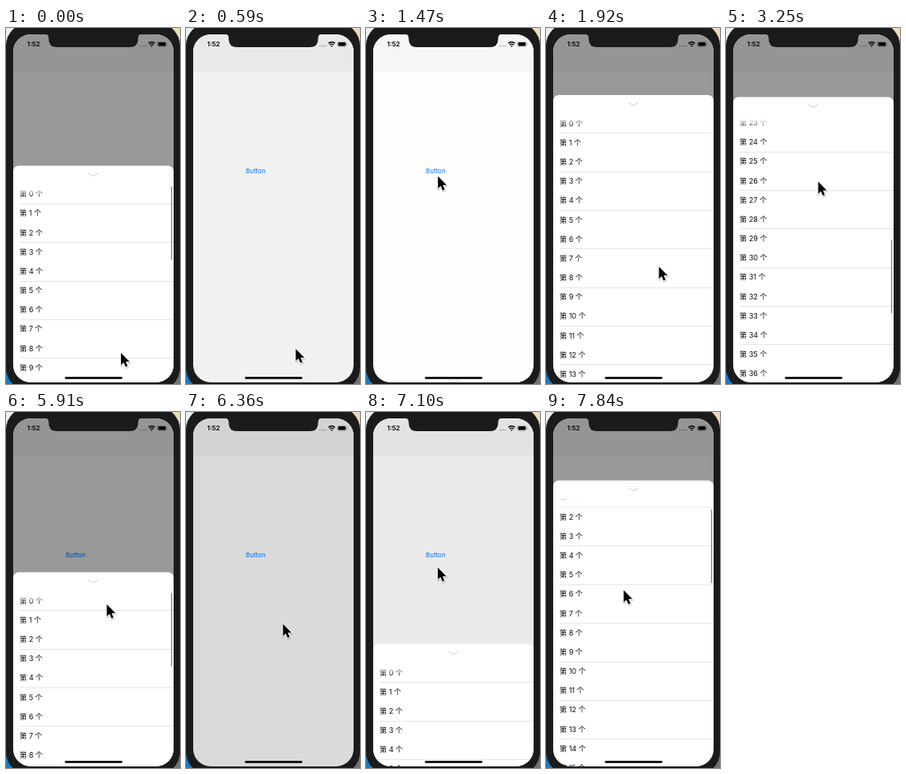
Animation, 218 px wide and 446 px high, one loop 7990 ms. Source, as an HTML page:

```html
<!DOCTYPE html>
<html lang="zh-CN">
<head>
<meta charset="utf-8">
<title>Bottom sheet</title>
<style>
  html, body { margin: 0; width: 100%; height: 100%; overflow: hidden; background: #1b1b1b; }
  #stage { display: block; width: 100%; height: 100%; }
  text { font-family: Inter, "Noto Sans CJK SC", "Noto Sans CJK", "Noto Sans CJK JP", sans-serif; }
  #rows text { font-size: 9.1px; fill: #0c0c0c; }
  #rows rect { fill: #e5e5e5; shape-rendering: crispEdges; }
</style>
</head>
<body>
<svg id="stage" viewBox="0 0 218 446">
  <defs>
    <clipPath id="screen"><rect x="9" y="8" width="201" height="436" rx="22"/></clipPath>
    <linearGradient id="fade" x2="0" y2="1">
      <stop offset=".25" stop-color="#fff"/>
      <stop offset="1" stop-color="#fff" stop-opacity="0"/>
    </linearGradient>
  </defs>

  <!-- desktop corners and phone body -->
  <rect width="109" height="40" fill="#e9eef1"/>
  <rect x="109" width="109" height="40" fill="#ead9bb"/>
  <rect y="400" width="109" height="46" fill="#1d7bc4"/>
  <rect x="109" y="400" width="109" height="46" fill="#6f7379"/>
  <rect y="-6" width="218" height="460" rx="28" fill="#1b1b1b"/>

  <g clip-path="url(#screen)">
    <rect x="9" y="8" width="201" height="436" fill="#fff"/>
    <rect x="9" y="8" width="201" height="47" fill="#f7f7f7"/>
    <text id="button" x="75" y="182.4" font-size="8" fill="#007aff">Button</text>
    <rect id="dim" x="9" y="8" width="201" height="436"/>

    <g id="sheet">
      <rect x="9" width="201" height="480" rx="7" fill="#fff"/>
      <path d="M103.5 9.6 L109.5 13 L115.5 9.6" fill="none" stroke="#dcdcdc" stroke-width="1.3" stroke-linecap="round"/>
      <svg x="9" y="24" width="201" height="440" viewBox="9 0 201 440">
        <g id="rows"></g>
        <rect x="9" width="201" height="14" fill="url(#fade)"/>
        <rect id="thumb" x="206.8" width="1.4" height="92" rx=".7" fill="#858585"/>
      </svg>
    </g>

    <rect x="73.8" y="436.9" width="72" height="2.8" rx="1.4"/>
    <text x="26.5" y="23" font-size="8.1" font-weight="600">1:52</text>
    <path d="M167 22.5h9" stroke="#000" stroke-opacity=".35" stroke-width="1.3" stroke-dasharray="1.3 1.2"/>
    <g fill="none" stroke="#000" stroke-width="1.4">
      <path d="M178.3 19.3q4.2-3.6 8.4 0M179.9 21.2q2.6-2.1 5.2 0"/>
      <path d="M182.5 24l-1.3-1.5q1.3-1 2.6 0z" fill="#000" stroke="none"/>
    </g>
    <rect x="189.8" y="17.3" width="11" height="6" rx="1.7" fill="none" stroke="#000" stroke-opacity=".4" stroke-width=".6"/>
    <rect x="190.6" y="18.1" width="9.4" height="4.4" rx="1"/>
    <rect x="201.4" y="19.3" width=".8" height="2" rx=".4" fill-opacity=".5"/>
  </g>

  <path d="M49 7.5Q53.5 8 53.5 12.5V14Q53.5 24 64 24H155Q165.5 24 165.5 14V12.5Q165.5 8 170 7.5Z" fill="#1b1b1b"/>
  <g id="cursor" stroke-linejoin="round">
    <path id="arrow" d="M0 0V15.2L3.4 12L5.8 17.6L8.4 16.5L6 11H10.8Z" transform="translate(.4 1)" opacity=".22" stroke="#000" stroke-width="2.4"/>
    <use href="#arrow" opacity="0"/>
    <path d="M0 0V15.2L3.4 12L5.8 17.6L8.4 16.5L6 11H10.8Z" stroke="#fff" stroke-width="2" paint-order="stroke"/>
  </g>
</svg>

<script>
const LOOP = 7990, STEP = 148, LAST = 53;
const PITCH = 24.17, ROWS = 50, REST = 86.4, BOTTOM = 446, DIM = 0.4;
const OPENINGS = [-2000, 1300, 6960], CLOSINGS = [210, 6067], FADE = 500;
const GRAB = 4884, SWIPE = 814, SCROLL_START = 2300, SCROLL_END = 4800, FLICK = 7640;
const $ = id => document.getElementById(id);

// Places where the pointer pauses; it eases from one to the next.
const stops = [
  { t: 0, x: 144, y: 407 },
  { t: 592, x: 137.5, y: 402 },
  { t: 1250, x: 88, y: 181 },
  { t: 1924, x: 141.5, y: 299 },
  { t: 3256, x: 115.5, y: 192.5 },
  { t: GRAB, x: 144.5, y: 126.5 },
  { t: CLOSINGS[1], x: 123, y: 262 },
  { t: 6364, x: 121.5, y: 265.5 },
  { t: 6900, x: 88, y: 181 },
  { t: FLICK, x: 98, y: 255 },
  { t: LOOP, x: 97, y: 204 }
];

const smooth = x => {
  x = Math.min(1, Math.max(0, x));
  return x * x * (3 - 2 * x);
};
const within = (t, from, to) => t >= from && t < to;
const lastBefore = (times, t) => times.findLast(time => time <= t) ?? -Infinity;

function cursorAt(t) {
  const i = stops.findLastIndex(stop => stop.t <= t);
  const a = stops[i], b = stops[i + 1];
  const p = smooth((t - a.t) / (b.t - a.t));
  const swiping = within(t, GRAB - 3 * SWIPE, GRAB);
  const swipe = swiping ? 120 * Math.sin(Math.PI * (GRAB - t) / SWIPE) ** 2 : 0;
  return { x: a.x + (b.x - a.x) * p, y: a.y + (b.y - a.y) * p + swipe };
}

// The list runs down and back once, then follows a last short flick.
function scrollAt(t) {
  if (within(t, SCROLL_START, SCROLL_END)) {
    return 643 * Math.sin(Math.PI * (t - SCROLL_START) / (SCROLL_END - SCROLL_START)) ** 2;
  }
  return Math.max(0, t - FLICK) * 0.188;
}

// Remaining distance of a lightly underdamped spring, from 1 to 0.
function spring(ms) {
  const s = ms / 1000, decay = 8, freq = Math.PI / 0.62;
  return Math.exp(-decay * s) * (Math.cos(freq * s) + decay / freq * Math.sin(freq * s));
}

// How far the pointer holds the sheet below its rest position.
function pullAt(t) {
  if (t < OPENINGS[1]) return 86;
  return within(t, GRAB, OPENINGS[2]) ? cursorAt(t).y - cursorAt(GRAB).y : 0;
}

function sheetAt(t) {
  const open = lastBefore(OPENINGS, t), close = lastBefore(CLOSINGS, t);
  const closing = close > open;
  const gone = closing ? smooth((t - close) / FADE) : 0;
  return {
    y: REST + pullAt(closing ? close : t) + (BOTTOM - REST) * spring(t - open) + BOTTOM * gone,
    dim: DIM * smooth((t - open) / FADE) * (1 - gone)
  };
}

function addToRows(tag, attrs, text = "") {
  const el = document.createElementNS("http://www.w3.org/2000/svg", tag);
  for (const name in attrs) el.setAttribute(name, attrs[name]);
  el.textContent = text;
  return $("rows").appendChild(el);
}

const lines = Array.from({ length: ROWS }, (_, i) => {
  addToRows("text", { x: 17, y: i * PITCH + 14.9 }, `第 ${i} 个`);
  return addToRows("rect", { x: 17, y: (i + 1) * PITCH - 0.7, width: 193, height: 1 });
});

const move = (id, x, y) => $(id).setAttribute("transform", `translate(${x} ${y})`);
const show = (id, opacity) => $(id).setAttribute("opacity", opacity);

function draw(t) {
  const sheet = sheetAt(t), cursor = cursorAt(t), scroll = scrollAt(t);
  move("sheet", 0, sheet.y);
  move("rows", 0, -scroll);
  move("thumb", 0, 2 + scroll * 0.2737);
  move("cursor", cursor.x, cursor.y);
  show("dim", sheet.dim);

  // Downscaled hairlines: only every other separator survives.
  const shift = scroll / PITCH % 1 > 0.5 ? 1 : 0;
  lines.forEach((line, i) => line.setAttribute("opacity", (i + shift) % 2 ? 0 : 1));

  const touching = t < 400 || within(t, SCROLL_START, 6300) || t >= FLICK;
  show("thumb", touching ? 1 : 0);
  show("button", OPENINGS.some(open => within(t, open - 130, open)) ? 0.3 : 1);
}

const start = performance.now();
function tick() {
  const t = (performance.now() - start) % LOOP;
  draw(Math.min(LAST, Math.floor((t + 6) / STEP)) * STEP);
  requestAnimationFrame(tick);
}
tick();
</script>
</body>
</html>
```
